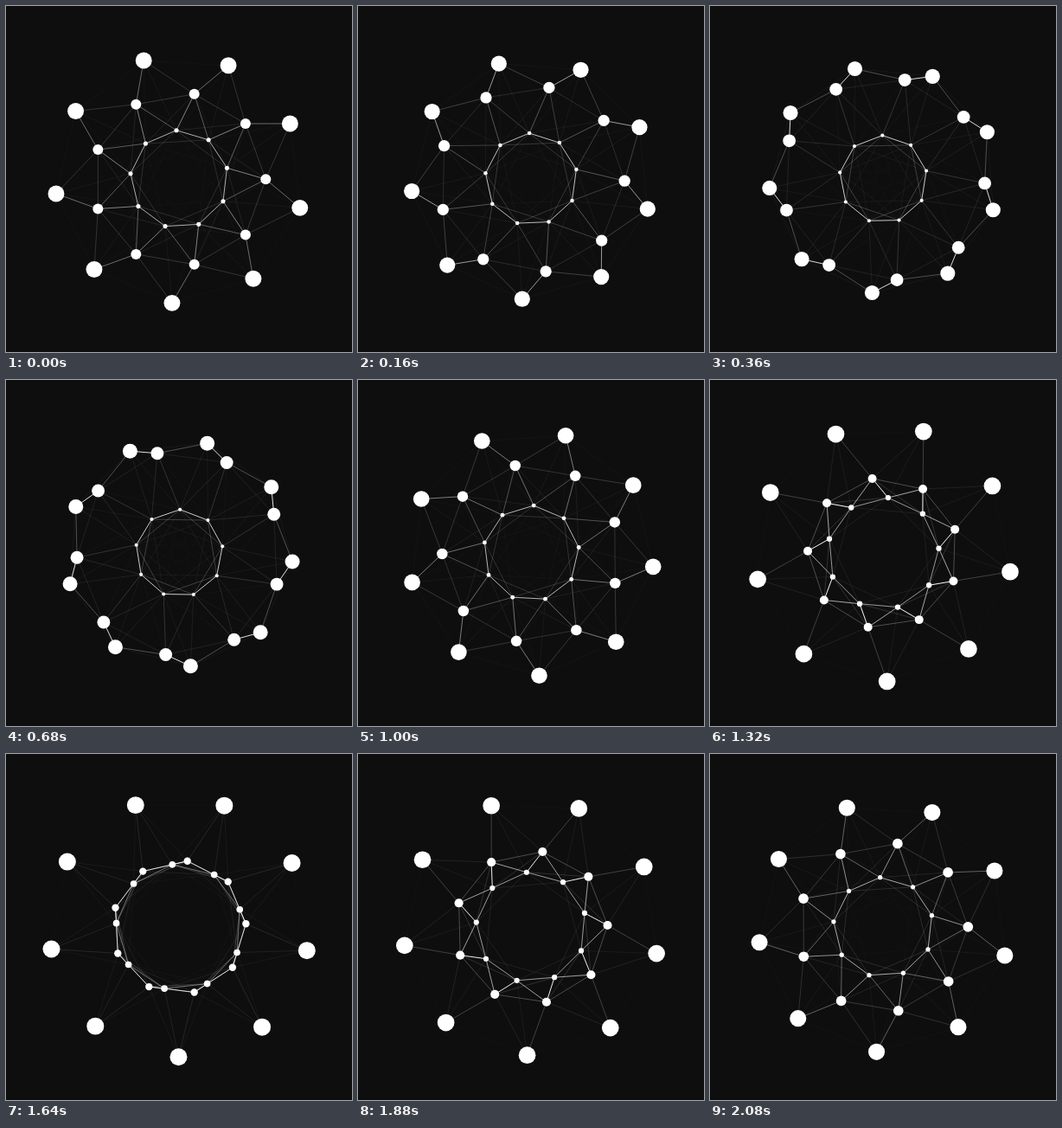
These frames come from a looping animation (400 by 400 pixels, 2120 ms). An HTML page with a canvas:

```html
<!DOCTYPE html>
<html lang="en">
<head>
<meta charset="utf-8">
<title>Linked rings</title>
<style>
  html, body { margin: 0; width: 100%; height: 100%; overflow: hidden; background: #0e0e0e; }
  canvas { display: block; width: 400px; height: 400px; }
</style>
</head>
<body>
<canvas id="stage" width="400" height="400"></canvas>
<script>
const ctx = document.getElementById('stage').getContext('2d');
const TAU = Math.PI * 2;
const COUNT = 27, LOOP = 2120, STEP = 40;
const CENTER = 200.3, REACH = 140;

// Each dot moves into its neighbour's place during one loop.
function dotAt(i, p) {
  const angle = (i + p) * TAU / COUNT;
  const wave = Math.sin((i + p) * TAU / 3);
  const dist = 100 + 50 * wave;
  return {
    x: CENTER + dist * Math.cos(angle),
    y: CENTER + dist * Math.sin(angle),
    r: 6 + 4 * wave
  };
}

function link(a, b) {
  const d = Math.hypot(a.x - b.x, a.y - b.y);
  if (d >= REACH) return;
  const alpha = Math.min(1, ((REACH - d) / 112) ** 4);
  ctx.strokeStyle = `rgba(255,255,255,${alpha.toFixed(4)})`;
  ctx.beginPath();
  ctx.moveTo(a.x, a.y);
  ctx.lineTo(b.x, b.y);
  ctx.stroke();
}

function draw(ms) {
  const p = Math.floor((ms % LOOP) / STEP) * STEP / LOOP;
  const dots = Array.from({ length: COUNT }, (_, i) => dotAt(i, p));

  ctx.fillStyle = '#0e0e0e';
  ctx.fillRect(0, 0, 400, 400);

  ctx.lineWidth = 1;
  dots.forEach((a, i) => dots.slice(i + 1).forEach(b => link(a, b)));

  ctx.fillStyle = '#fff';
  for (const { x, y, r } of dots) {
    ctx.beginPath();
    ctx.arc(x, y, r, 0, TAU);
    ctx.fill();
  }
}

let start;
function tick(now) {
  start ??= now;
  draw(Math.max(0, now - start));
  requestAnimationFrame(tick);
}
draw(0);
requestAnimationFrame(tick);
</script>
</body>
</html>
```
